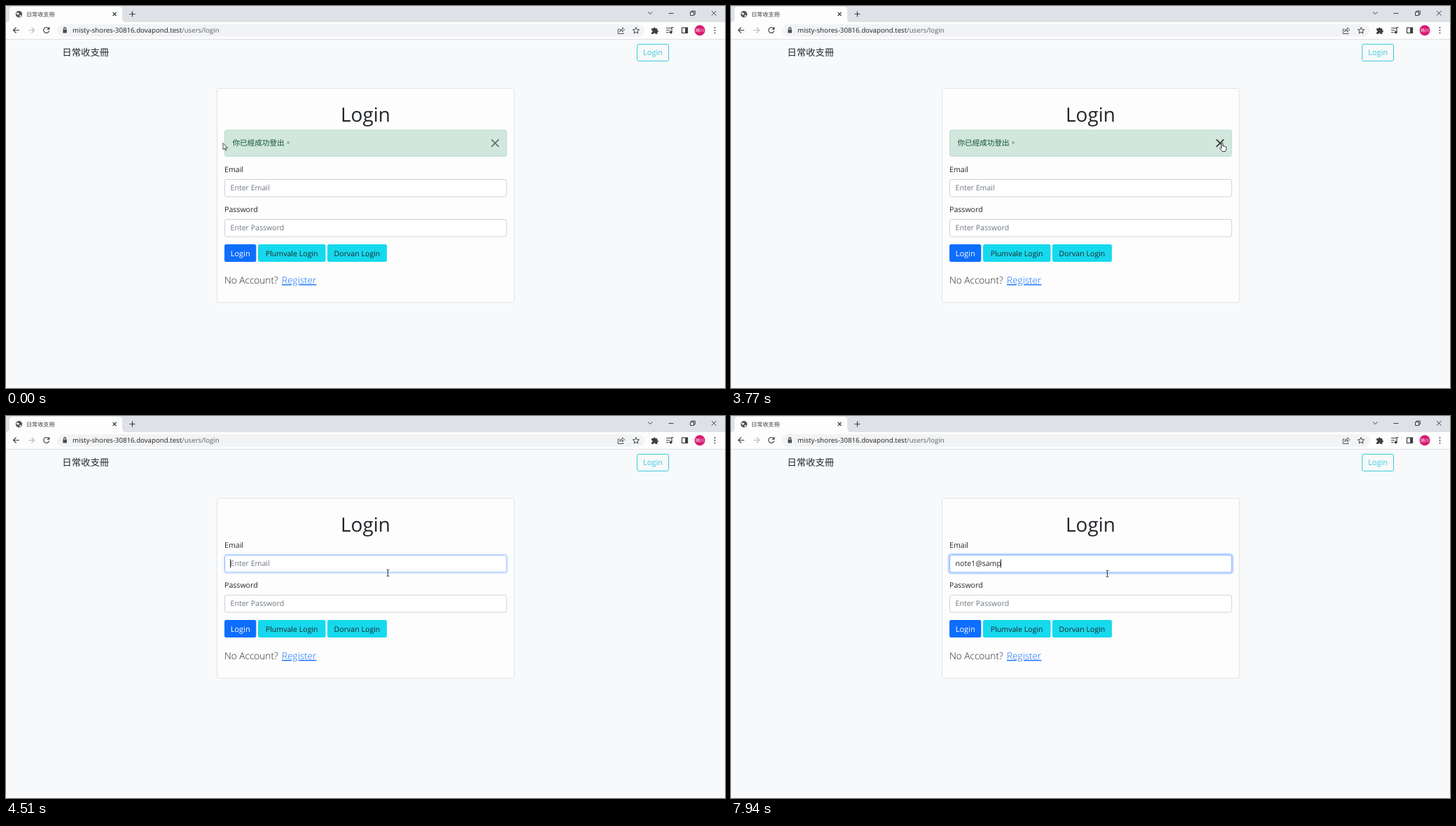
Animation, 1027 px wide and 545 px high, one loop 8 s. Source, as an HTML page:

```html
<!DOCTYPE html>
<html lang="zh-Hant">
<head>
<meta charset="utf-8">
<title>Login</title>
<style>
  html, body { margin: 0; width: 100%; height: 100%; overflow: hidden; background: #f8f9fa; }
  svg { display: block; width: 1027px; height: 545px; }
  text { font: 10.6px "Open Sans", "Noto Sans CJK TC", "Noto Sans CJK", sans-serif; fill: #212529; text-rendering: geometricPrecision; white-space: pre; }
  .mid { text-anchor: middle; }
  .hint { fill: #6c757d; }
  .line { fill: none; stroke: #3c4043; stroke-width: 1.2; }
  .field { fill: #fff; stroke: #ced4da; }
  .ring { fill: none; stroke: #0d6efd; stroke-opacity: .25; stroke-width: 2.7; }
  .info { fill: #16d9ee; }
  .lead { font-size: 13.6px; font-weight: 300; }
</style>
</head>
<body>
<svg viewBox="0 0 1027 545">
  <!-- browser window -->
  <rect width="1027" height="24" fill="#dee1e6"/>
  <path d="M0 23Q5 23 5 18V6Q5 1 10 1H161Q166 1 166 6V18Q166 23 171 23H1027V47H0Z" fill="#fdfdfd"/>
  <path d="M0 47.5H1027" stroke="#dfe1e5"/>
  <circle cx="18.5" cy="11.8" r="4.7" fill="#505458"/>
  <path d="M15 9.5l3 .3 1 1.7-2 1.2-2-1.2zM19.5 13.2l2.4-.6-1 2.4-1.8.6z" fill="#fdfdfd"/>
  <text x="29" y="15" style="font-size:8.1px;fill:#3c4043">日常收支冊</text>
  <g class="line">
    <path d="M152.6 9l5 5m0-5l-5 5M176.5 11.5h8m-4-4v8"/>
    <path d="M917 8.5l3.2 3 3.2-3M946.5 10.5h7M1008 7l6.5 6.5m0-6.5l-6.5 6.5" stroke-width="1"/>
    <path d="M977.5 8.5h5v5h-5zM979.3 8.3V7h5v5h-1.5" stroke-width="1"/>
    <path d="M19 34.5h-8.5m4-4l-4 4 4 4"/>
    <path d="M32 34.5h8.5m-4-4l4 4-4 4" stroke="#b8babd"/>
    <path d="M61.2 32.5a4 4 0 1 0 .4 3M61.8 30v3.2h-3.2"/>
  </g>
  <rect x="73" y="26" width="839" height="18" rx="9" fill="#f1f3f4"/>
  <rect x="81.3" y="33.5" width="5.6" height="5" rx=".6" fill="#4a4e52"/>
  <path class="line" d="M82.6 33.5v-1.3a1.5 1.5 0 0 1 3 0v1.3" stroke-width="1"/>
  <text x="95" y="38.3" style="font-size:9.7px;fill:#202124">misty-shores-30816.dovapond.test<tspan fill="#5f6368">/users/login</tspan></text>
  <g class="line" stroke-width="1">
    <path d="M876.5 33h-2.3v6.5h7.5V38M876.5 36.5q.5-3.7 4-3.7v-2l3 3-3 3v-2q-2.5 0-4 1.7z" stroke-width=".9"/>
    <path d="M900 30.5l1.3 3 3.3.3-2.5 2.1.8 3.2-2.9-1.8-2.9 1.8.8-3.2-2.5-2.1 3.3-.3z" stroke-width="1"/>
    <path d="M943 31.5h7.5M943 34.5h5M943 37.5h3.5M951 37.3v-6.8h2.3" stroke-width="1.1"/>
    <circle cx="949.6" cy="37.5" r="1.4" fill="#3c4043"/>
    <rect x="965.5" y="31" width="8" height="7.5"/>
  </g>
  <path d="M922 32h2.7a1.5 1.5 0 0 1 3 0h2.6v2.6a1.5 1.5 0 0 1 0 3v2.3h-2.6a1.5 1.5 0 0 0-3 0H922v-2.4a1.5 1.5 0 0 0 0-3zM970 31h3.5v7.5H970z" fill="#3c4043"/>
  <circle cx="991" cy="34.7" r="7.5" fill="#d81b72"/>
  <text class="mid" x="991" y="37" style="font-size:6px;fill:#fff">晴川</text>
  <path d="M1012.5 31v.01M1012.5 34.7v.01M1012.5 38.4v.01" stroke="#3c4043" stroke-width="1.9" stroke-linecap="round"/>

  <!-- page -->
  <text x="80.3" y="71" style="font-size:13.4px">日常收支冊</text>
  <rect x="901.5" y="54.5" width="45" height="24" rx="2.5" fill="none" stroke="#3ccbdc"/>
  <text class="mid" x="924" y="70.2" style="font-size:11px;fill:#3ccbdc">Login</text>
  <rect id="card" x="301.5" y="117.5" width="424.5" height="305.5" rx="2.7" fill="#fdfdfd" stroke="#e2e3e5"/>
  <text class="mid" x="513.5" y="165" style="font-size:28px">Login</text>

  <g id="alert">
    <rect x="312.5" y="177" width="402.5" height="37.5" rx="2.7" fill="#d1e7dd" stroke="#badbcc"/>
    <text x="323.5" y="199.3" style="fill:#0f5132;font-weight:300">你已經成功登出。</text>
    <rect id="closeRing" class="ring" x="682.5" y="177" width="33" height="37.5" rx="3.5"/>
    <path id="close" d="M693.8 190.8l9.6 9.6m0-9.6l-9.6 9.6" stroke="#000" stroke-width="1.7" stroke-linecap="round"/>
  </g>

  <g id="form">
    <text x="312" y="237">Email</text>
    <rect id="ring" class="ring" x="311" y="246" width="405.5" height="27.5" rx="3.8"/>
    <rect id="email" class="field" x="312.5" y="247.5" width="402.5" height="24.5" rx="2.5"/>
    <text id="value" x="320.5" y="263.2"></text>
    <path id="caret" d="M.5 253.5v12" stroke="#212529"/>
    <text x="312" y="294">Password</text>
    <rect class="field" x="312.5" y="304.5" width="402.5" height="24.5" rx="2.5"/>
    <text class="hint" x="320.5" y="320.4">Enter Password</text>
    <rect x="312" y="340" width="45.3" height="25" rx="2.5" fill="#0d6efd"/>
    <text class="mid" x="334.7" y="356.5" style="font-size:11px;fill:#fff">Login</text>
    <rect class="info" x="360" y="340" width="96.5" height="25" rx="2.5"/>
    <text class="mid" x="408.2" y="356.5">Plumvale Login</text>
    <rect class="info" x="459" y="340" width="85" height="25" rx="2.5"/>
    <text class="mid" x="501.5" y="356.5">Dorvan Login</text>
    <text class="lead" x="312" y="396">No Account?</text>
    <text class="lead" x="394" y="396" style="fill:#0d6efd;text-decoration:underline">Register</text>
  </g>

  <g id="pointer" stroke-linejoin="round">
    <path id="arrow" d="M.5 .5V9.8L2.6 7.8 4 11 5.5 10.4 4.1 7.3H7Z" fill="#fff" stroke="#222" stroke-width=".8"/>
    <path id="hand" d="M1.2 7V1.2a1 1 0 0 1 2 0V4.6l3.2.6 1.6.9v3.4l-1.2 3H2.4L-.9 8.4a.9.9 0 0 1 1.2-1.2l.9.8z" fill="#fff" stroke="#222" stroke-width=".9"/>
    <path id="beam" d="M-1.8-4.5h1.3L0-4 .5-4.5h1.3M0-4v8M-1.8 4.5h1.3L0 4l.5.5h1.3" fill="none" stroke="#222" stroke-width=".9"/>
  </g>
</svg>
<script>
const LOOP = 8000, CLICK_CLOSE = 3795, REMOVED = 3940, FOCUS = 4470, SHIFT = 49;
const $ = id => document.getElementById(id);
const clamp = v => Math.max(0, Math.min(1, v));
const ease = v => v * v * (3 - 2 * v);
const show = (id, on) => $(id).setAttribute("visibility", on ? "visible" : "hidden");
const set = (id, name, v) => $(id).setAttribute(name, v);

// pointer stops: time, x, y
const path = [
  [40, 309.5, 195], [100, 307, 199], [570, 307, 199], [600, 305, 202],
  [770, 305, 202], [940, 281, 241], [1470, 281, 241], [1600, 270, 247],
  [1910, 270, 247], [2240, 69.5, 322], [3610, 69.5, 322], [3780, 704.5, 194],
  [4370, 704.5, 194], [4510, 545.5, 224], [4570, 537.5, 225]
];
const typed = "note1@samp";
const keys = [6000, 6090, 6160, 6240, 6430, 6990, 7310, 7540, 7730, 7940];
const blinks = [[FOCUS, 4540], [4925, 5425], [5935, LOOP]];

function pointerAt(t) {
  const i = path.findIndex(p => p[0] > t);
  if (i < 0) return path[path.length - 1].slice(1);
  if (!i) return path[0].slice(1);
  const [a, b] = [path[i - 1], path[i]];
  const k = ease((t - a[0]) / (b[0] - a[0]));
  return [a[1] + (b[1] - a[1]) * k, a[2] + (b[2] - a[2]) * k];
}

function draw(t) {
  const open = t < REMOVED, focused = t >= FOCUS;
  show("alert", open);
  show("closeRing", open && t >= CLICK_CLOSE);
  set("alert", "opacity", 1 - clamp((t - CLICK_CLOSE) / 150));
  set("close", "opacity", t < 3765 ? .5 : t < CLICK_CLOSE ? .75 : 1);
  set("card", "height", open ? 305.5 : 305.5 - SHIFT);
  set("form", "transform", `translate(0 ${open ? 0 : -SHIFT})`);

  const glow = ease(clamp((t - FOCUS) / 110));
  set("ring", "opacity", glow);
  $("email").style.stroke = focused ? "#86b7fe" : "";

  const count = keys.filter(k => k <= t).length;
  const value = $("value");
  value.textContent = count ? typed.slice(0, count) : "Enter Email";
  value.setAttribute("class", count ? "" : "hint");
  const width = count ? value.getComputedTextLength() : 0;
  set("caret", "transform", `translate(${Math.round(320 + width)} 0)`);
  show("caret", blinks.some(([a, b]) => t >= a && t < b));

  const [x, y] = pointerAt(t);
  set("pointer", "transform", `translate(${x} ${y})`);
  const hand = t >= 3765 && open;
  show("hand", hand);
  show("beam", focused);
  show("arrow", !hand && !focused);
}

function frame() {
  draw(performance.now() % LOOP);
  requestAnimationFrame(frame);
}
frame();
</script>
</body>
</html>
```
